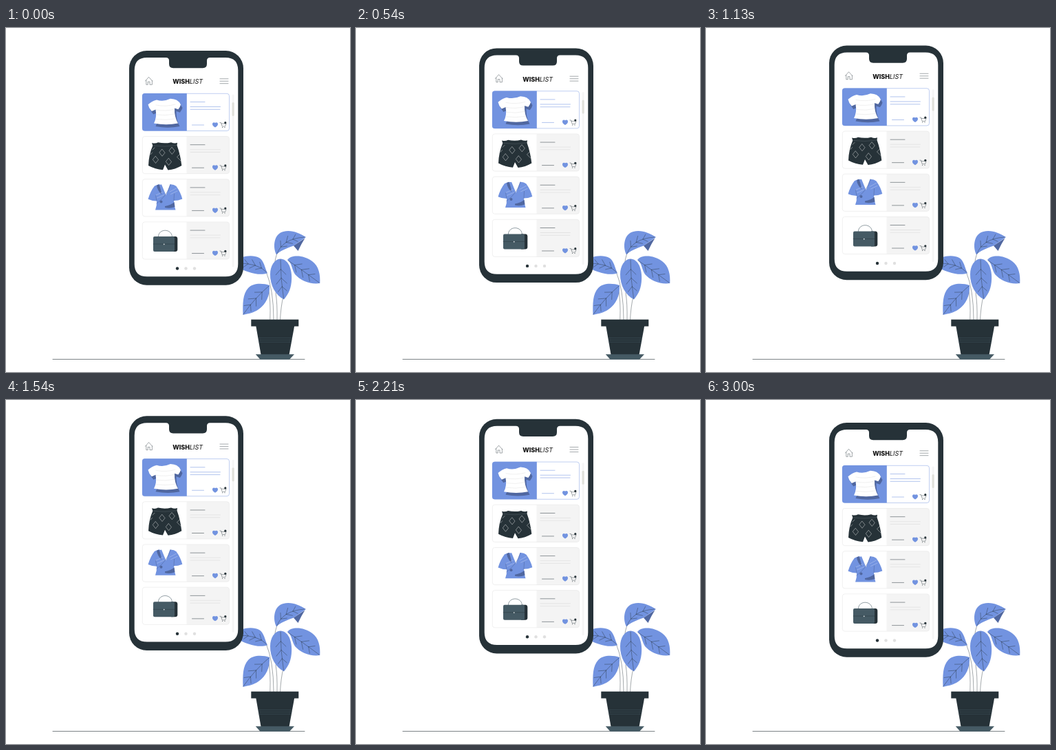
Animation, 500 px wide and 500 px high, one loop 3040 ms. Source, as an HTML page:

```html
<!DOCTYPE html>
<html lang="en">
<head>
<meta charset="utf-8">
<title>Wishlist</title>
<style>
  html, body { margin: 0; height: 100%; overflow: hidden; background: #fff; }
  svg { display: block; width: 100%; height: 100%; }
  .dark { fill: #263238; }
  .slate { fill: #455a64; }
  .blue { fill: #7293e0; }
  .shade { fill: #5067a0; }
  .white { fill: #fff; }
  .line { fill: none; stroke: #263238; stroke-width: .42; stroke-linecap: round; stroke-linejoin: round; }
  .pale { stroke: #dcdcdc; }
  .card { --strong: #37434a; --soft: #d6d6d6; }
  .first { --strong: #7293e0; --soft: #7293e0; }
  .strong { stroke: var(--strong); stroke-width: .55; }
  .soft { stroke: var(--soft); stroke-width: .55; }
  text { font: 800 9px Inter, "Open Sans", sans-serif; fill: #111; }
  .thin { font-weight: 400; font-style: italic; }
</style>
</head>
<body>
<svg viewBox="0 0 500 500">
  <defs>
    <g id="info">
      <path class="line strong" d="M268 107.500h21M270.500 141h17"/>
      <path class="line soft" d="M268 114.500h43.500M268 118.300h43"/>
      <path class="blue" d="M304 144.500C301 143 299.900 141.300 300 139.600C300.100 136.900 303 136.600 304 138C305 136.600 307.900 136.900 308 139.600C308.100 141.300 307 143 304 144.500Z"/>
      <path class="line" d="M310.800 137.500h1.700l1.700 5.500h4.400l1.400-4h-7.200"/>
      <circle class="dark" cx="314.600" cy="144.500" r=".5"/>
      <circle class="dark" cx="318" cy="144.500" r=".5"/>
      <circle class="dark" cx="318.800" cy="137.700" r="1.600"/>
    </g>
    <g id="card">
      <rect class="white" x="198.300" y="95.300" width="126.200" height="54.200" rx="3.500"/>
      <path d="M262.500 95.300H321a3.500 3.500 0 0 1 3.500 3.500V146a3.500 3.500 0 0 1-3.500 3.500H262.500Z" fill="#f4f4f4"/>
      <rect x="198.300" y="95.300" width="126.200" height="54.200" rx="3.500" fill="none" stroke="#e6e6e6" stroke-width=".6"/>
      <use href="#info"/>
    </g>
    <path id="tee" d="M219 104.500Q229 107.500 239 102.800Q245 103.200 248 104.800Q252 107 254 111.500Q253 115 250.300 118.300L245 116.500Q244.500 129 250 138.500Q233 142 215 138.500Q219.500 130 217.500 118.500L211.800 121Q207.500 116.500 206.500 111.300Q212 106 219 104.500Z"/>
    <path id="diamond" class="line" d="M0-5L4 0L0 5L-4 0Z" style="stroke:#fff"/>
  </defs>

  <path class="line" d="M68 481.500H434" style="stroke-width:.6"/>

  <g id="plant">
    <path class="line" d="M378 354Q389 380 389 424M381 376Q385 396 383.800 424M392 385Q394.500 400 394 424M403 390Q399.500 405 398.500 424M394 327Q388 345 390 365"/>
    <g class="blue">
      <path d="M393 329.500C387 317 390 299 403 296C415 293 426 298 436 304L418 316.500C409 320 399 323 393 329.500Z"/>
      <path d="M330 340C342 331 358 329 368 334C375 338 376 348 380 356.500C368 360 352 357 330 344Z"/>
      <path d="M409 337C415 329 433 330 445 339C455 346 457 359 456.300 371C442 373 428 367 420 358C415 350 416 342 409 337Z"/>
      <path d="M399 335.500C409 336 415 347 415.200 363C415 378 411 386 404 394.500C391 388 384 374 384 358C384 346 390 336 399 335.500Z"/>
      <path d="M383 374C384 388 378 402 367 409C360 414 353 415 344.500 417C344 400 344 387 352 378C359 370 374 371 383 374Z"/>
    </g>
    <path class="shade" d="M418 316.500L434.500 305.500Q429 314 424.500 324Z"/>
    <path id="veins" class="line"/>
    <path class="dark" d="M363.300 433H419.200L411.500 475H370.600Z"/>
    <rect class="dark" x="356.300" y="423.700" width="69" height="9.900"/>
    <path class="slate" d="M362.800 474.300H419L412 481.700H369.500Z"/>
    <path class="line" d="M367 450.500H415.500M367.500 453.500H415M368 456.500H414.500" style="stroke:#455a64"/>
  </g>

  <g id="phone">
    <rect class="dark" x="179" y="33" width="166" height="340.700" rx="25.500"/>
    <path class="white" d="M205 43H232.500Q237 43 237 47.500V52.300Q237 58.200 243 58.200H286Q292 58.200 292 52.300V47.500Q292 43 296.500 43H319Q337.300 43 337.300 61.500V343Q337.300 361.300 319 361.300H205Q186.700 361.300 186.700 343V61.500Q186.700 43 205 43Z"/>

    <path class="line" d="M202.500 77L207.500 71.300L212.700 77M203.800 76V82.300H206.200V78.200H209V82.300H212.400V76.500"/>
    <text x="242.200" y="81.300">WISH</text>
    <text class="thin" x="267" y="81.300">LIST</text>
    <path class="line" d="M311 73.800h12M311 77.300h12M311 80.700h12"/>

    <rect x="328.600" y="96.500" width="3" height="251" rx="1.500" fill="#f5f5f5"/>
    <rect x="328.600" y="108" width="3" height="20" rx="1.500" fill="#e0e0da"/>

    <g class="card first">
      <rect class="white" x="198.300" y="95.300" width="126.200" height="54.200" rx="3.500"/>
      <rect x="198.300" y="95.300" width="126.200" height="54.200" rx="3.500" fill="none" stroke="#7293e0" stroke-width=".45"/>
      <path class="blue" d="M262.800 95H201.500a3.500 3.500 0 0 0-3.500 3.500V146a3.500 3.500 0 0 0 3.500 3.500H262.800Z"/>
      <use class="shade" href="#tee" x="2.500" y="4.500"/>
      <use class="white" href="#tee"/>
      <path class="line pale" d="M218 112Q232 115 246 111M218 119Q232 121.500 245 118M218.500 126Q232 128 245 125M218 132.500Q232 134.500 246 132"/>
      <use href="#info"/>
    </g>

    <g class="card">
      <use href="#card" y="62.200"/>
      <path class="dark" d="M212 167Q217 168.500 221 166.300Q231 168.500 240 166.200Q245 168.300 249 166.800L248.500 170.500Q253.500 184 255.300 200Q246 205.500 235.500 206.500L231 198.500L228 206.300Q217 205.500 207 200Q207.500 184 213.300 171Z"/>
      <path class="line" d="M214 171Q231 173.500 248 170.500" style="stroke:#5c696f"/>
      <use href="#diamond" x="227" y="181.300"/>
      <use href="#diamond" x="241.300" y="178.500"/>
      <use href="#diamond" x="217.500" y="191.500"/>
      <use href="#diamond" x="236.500" y="194.500"/>
      <path class="line" d="M253 183L248.500 187.500L254 193M213 177L216 174M210 184L212.500 181" style="stroke:#fff"/>
    </g>

    <g class="card">
      <use href="#card" y="124.400"/>
      <path class="blue" d="M222 227.300Q225 228 226 227.300L232.500 243L238.500 227.300Q244 227 247.500 230Q254 239 256.300 248.500Q250 251 244 251Q244 258 246.500 264.500H217Q219.500 258 219 251.500Q212 251.500 206.500 248.800Q210 237 216 229.500Z"/>
      <path class="shade" d="M219 228.500L222.500 227.300Q225.500 236 226 242Q220 236 219 228.500ZM231 259Q240 257.500 244.500 253L245.500 260Q238 263 231 261Z"/>
      <circle class="shade" cx="225.500" cy="252.500" r="2"/>
      <path class="line" d="M217.500 243L228 238.500M219.500 247L230 242.500M238 238L247.500 233M239.500 241.500L249 237" style="stroke:#c9d6f5"/>
      <path class="line" d="M239 227.500Q235 243 219 255M219 251L217.500 243M244 251L244.500 241" style="stroke:#455a8c"/>
    </g>

    <g class="card">
      <use href="#card" y="186.600"/>
      <path class="line" d="M221.300 303.500C221.500 291 241 291 241.500 303.500" style="stroke:#455a64;stroke-width:.6"/>
      <path class="dark" d="M240 303H247Q249.300 303.500 249.300 306V322Q249.300 325 246 325H240Z"/>
      <rect class="slate" x="214" y="303" width="31" height="22" rx="2"/>
      <path class="line" d="M214 314H228.500M231 314H245"/>
      <circle cx="229.700" cy="314.300" r=".9" fill="#d5dadd"/>
    </g>

    <circle class="dark" cx="249" cy="349.500" r="2.200"/>
    <circle cx="261.500" cy="349.500" r="2.200" fill="#e0e0e0"/>
    <circle cx="274" cy="349.500" r="2.200" fill="#e0e0e0"/>
  </g>
</svg>
<script>
  const LOOP = 3040, PERIOD = 3000, RISE = 10;
  const phone = document.getElementById('phone');

  // A curved midrib with paired side veins leaning towards the tip.
  function veins(x0, y0, cx, cy, x1, y1, length) {
    let d = `M${x0} ${y0}Q${cx} ${cy} ${x1} ${y1}`;
    for (const t of [.25, .48, .7]) {
      const u = 1 - t;
      const x = u * u * x0 + 2 * u * t * cx + t * t * x1;
      const y = u * u * y0 + 2 * u * t * cy + t * t * y1;
      const angle = Math.atan2(u * (cy - y0) + t * (y1 - cy), u * (cx - x0) + t * (x1 - cx));
      const size = length * (1 - .7 * Math.abs(t - .4));
      for (const side of [-.75, .75]) {
        d += `M${x} ${y}l${size * Math.cos(angle + side)} ${size * Math.sin(angle + side)}`;
      }
    }
    return d;
  }

  document.getElementById('veins').setAttribute('d', [
    [394, 328, 402, 306, 434, 304, 10],
    [379, 355, 366, 341, 335, 342, 10],
    [410, 338, 428, 350, 455, 370, 12],
    [399, 337, 399, 364, 403.5, 393, 12],
    [382, 375, 362, 392, 345, 416, 12]
  ].map(leaf => veins(...leaf)).join(''));

  function draw(now) {
    const phase = Math.min(now % LOOP, PERIOD) / PERIOD;
    const lift = RISE * (1 - Math.abs(1 - 2 * phase));
    phone.setAttribute('transform', `translate(0 ${-lift})`);
    requestAnimationFrame(draw);
  }
  draw(performance.now());
</script>
</body>
</html>
```
